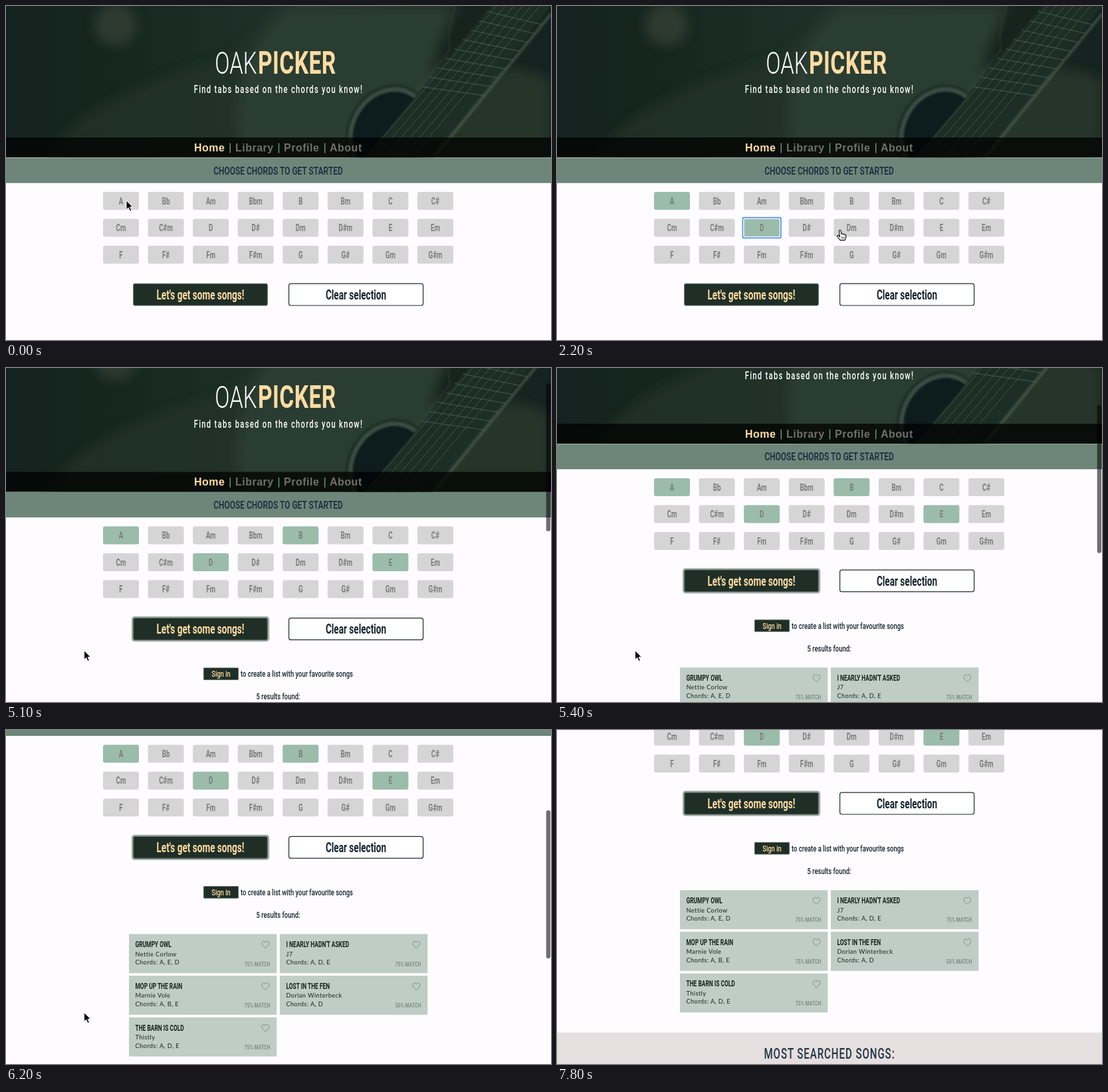
An HTML page that plays this animation: 820 px wide and 503 px high, repeating every 7.9 s.

```html
<!DOCTYPE html>
<html lang="en">
<head>
<meta charset="utf-8">
<title>Chord search</title>
<style>
  html, body { margin: 0; width: 100%; height: 100%; overflow: hidden; background: #fefcfe; }
  svg { display: block; width: 820px; height: 503px; }
  .cond { font-family: Roboto, "Open Sans", sans-serif; }
  .nav { font: bold 16px "Liberation Sans", Arial, sans-serif; letter-spacing: .5px; }
  .info { font: 500 9.2px Lato, "Open Sans", sans-serif; letter-spacing: .4px; fill: #25332d; }
</style>
</head>
<body>
<svg id="stage" viewBox="0 0 820 503"></svg>
<script>
const LOOP = 7900;
const CONDENSE = 0.7; // one factor turns the sans face into a condensed one
const DARK = '#1f2f27', CREAM = '#ffdca3', GREY = '#d6d5d6', GREEN = '#9bbcab';

const cond = (x, y, size, text, { fill = '#16242e', weight = 700, anchor = 'middle', gap = 0 } = {}) =>
  `<text class="cond" transform="translate(${x} ${y}) scale(${CONDENSE} 1)" font-size="${size}" fill="${fill}"
    font-weight="${weight}" text-anchor="${anchor}" letter-spacing="${gap}">${text}</text>`;

const rect = (x, y, w, h, fill, extra = '') =>
  `<rect x="${x}" y="${y}" width="${w}" height="${h}" fill="${fill}" ${extra}/>`;

const line = (x1, y1, x2, y2, extra) =>
  `<path d="M${x1} ${y1}L${x2} ${y2}" fill="none" ${extra}/>`;

const mix = (a, b, k) => a + (b - a) * k;

const CHORDS = ('A Bb Am Bbm B Bm C C# Cm C#m D D# Dm D#m E Em ' +
  'F F# Fm F#m G G# Gm G#m').split(' ');
const chordX = i => 146 + (i % 8) * 67.57;
const chordY = i => 280 + Math.floor(i / 8) * 40.5;

const CLICKS = [['A', 500], ['D', 1700], ['E', 2850], ['B', 3550]];
const SUBMIT_AT = 4400, RESULTS_AT = 4600, IDLE_AT = 7000;

const SONGS = [
  ['GRUMPY OWL', 'Nettie Corlow', 'A, E, D', 75],
  ["I NEARLY HADN'T ASKED", 'J7', 'A, D, E', 75],
  ['MOP UP THE RAIN', 'Marnie Vole', 'A, B, E', 75],
  ['LOST IN THE FEN', 'Dorian Winterbeck', 'A, D', 50],
  ['THE BARN IS COLD', 'Thistly', 'A, D, E', 75]
];

function photo() {
  let strings = '', frets = '';
  for (let i = 0; i < 6; i++) {
    strings += line(738 + i * 13, 0, 541 + i * 14, 228, 'stroke="#62766a" stroke-width=".9" opacity=".6"');
  }
  for (let i = 0; i < 9; i++) {
    const k = i / 9 * 0.62;
    frets += line(mix(724, 545, k), mix(8, 214, k), mix(806, 650, k), mix(28, 222, k),
      'stroke="#51665a" stroke-width="1.5" opacity=".55"');
  }
  return `<g clip-path="url(#photoClip)">
    ${rect(0, 0, 820, 228, 'url(#backdrop)')}
    <g filter="url(#blur)">
      <circle cx="165" cy="28" r="32" fill="#344135" opacity=".75"/>
      <path d="M60 228C110 150 210 110 330 80L420 0H560L470 228Z" fill="#22332c" opacity=".7"/>
      <path d="M430 0H676C660 40 640 75 668 100L700 145 640 235H360C330 150 360 50 430 0Z" fill="#2c3d33"/>
      <path d="M690 110Q760 80 820 112V228H620Z" fill="#283529"/>
      <path d="M684 0H740L640 110Q640 60 684 0Z" fill="#13231f"/>
    </g>
    <g filter="url(#soft)">
      <path d="M430 0H677Q662 38 668 66L600 150" fill="none" stroke="#3a4a3e" stroke-width="2" opacity=".5"/>
      <ellipse cx="577" cy="190" rx="56" ry="66" transform="rotate(28 577 190)" fill="#0e1d1c"
        stroke="#3b4f44" stroke-width="5"/>
      <ellipse cx="577" cy="190" rx="62" ry="72" transform="rotate(28 577 190)" fill="none"
        stroke="#1a2a25" stroke-width="3"/>
      <path d="M730 0H820L642 228H540Z" fill="#1b2d27"/>
      <path d="M820 12L644 228" stroke="#4c5f50" stroke-width="4" opacity=".7"/>
    </g>
    ${frets}${strings}
    ${rect(0, 198, 820, 30, '#000', 'opacity=".74"')}
  </g>`;
}

function header() {
  const nav = [[283, 'Home', CREAM], [345, 'Library'], [418, 'Profile'], [487, 'About']]
    .map(([x, label, fill = '#706f6d']) => `<text class="nav" x="${x}" y="218.8" fill="${fill}">${label}</text>`).join('');
  const bars = [337.3, 410.5, 479.7].map(x => rect(x - .7, 206.5, 1.4, 15, '#6d9a85')).join('');
  return photo() +
    cond(377.5, 102, 47, 'OAK', { fill: '#fff', weight: 300, anchor: 'end' }) +
    cond(379, 102, 48, 'PICKER', { fill: CREAM, anchor: 'start', gap: .6 }) +
    cond(410, 131.3, 16, 'Find tabs based on the chords you know!', { fill: '#fff', weight: 500, gap: 1.85 }) +
    nav + bars +
    rect(0, 228.5, 820, 37.7, '#6e867a') + rect(0, 265.7, 820, .7, '#566c61') +
    cond(409.5, 253.6, 17.1, 'CHOOSE CHORDS TO GET STARTED', { fill: '#213443' });
}

const chordButtons = () => CHORDS.map((name, i) =>
  rect(chordX(i), chordY(i), 54, 27, GREY, `rx="3" id="chord${i}"`) +
  cond(chordX(i) + 27, chordY(i) + 18.7, 14, name, { fill: '#7b7b7b' })).join('');

const actions = () =>
  `<rect id="submitRing" x="190.3" y="416.9" width="204.6" height="35.4" rx="3" fill="none" stroke="#9fa9a6" stroke-width="2.6"/>` +
  rect(191.7, 418.2, 201.6, 32.8, DARK, 'rx="2" stroke="#59665f" stroke-width="1"') +
  cond(292.5, 441.8, 19.4, "Let's get some songs!", { fill: CREAM }) +
  rect(425.6, 418.2, 202, 32.8, '#fff', `rx="3" stroke="${DARK}" stroke-width="1.2"`) +
  cond(526.5, 441.8, 19.4, 'Clear selection');

function card([title, artist, chords, match], i) {
  const x = 185 + (i % 2) * 227, y = 565.2 + Math.floor(i / 2) * 62.7;
  return `<g transform="translate(${x} ${y})">
    ${rect(0, 0, 222.3, 58.8, '#c0ccc6')}
    ${cond(9.5, 19.8, 12, title, { fill: '#15231d', anchor: 'start' })}
    <text class="info" x="9.5" y="33.4">${artist}</text>
    <text class="info" x="9.5" y="45.9">Chords: ${chords}</text>
    ${cond(212.5, 48.2, 9.9, match + '% MATCH', { fill: '#7c8f86', anchor: 'end' })}
    <path d="M205.4 21.2C201.8 18.3 200 16.2 200 13.9 200 10.6 204 9.9 205.4 12.6 206.8 9.9 210.8 10.6 210.8 13.9 210.8 16.2 209 18.3 205.4 21.2Z"
      fill="none" stroke="#7d8f87" stroke-width="1"/>
  </g>`;
}

const results = () => `<g id="results">
  ${rect(297.4, 493.3, 52.2, 17.8, DARK, 'rx="1" stroke="#59665f" stroke-width=".8"')}
  ${cond(323.5, 506.7, 13.4, 'Sign in', { fill: CREAM, weight: 500 })}
  ${cond(353, 506.7, 13.5, 'to create a list with your favourite songs', { weight: 500, anchor: 'start' })}
  ${cond(409.5, 540.9, 13.5, '5 results found:', { weight: 500 })}
  ${SONGS.map(card).join('')}
  ${rect(0, 779.6, 820, 120, '#e5dfdf')}
  ${cond(410, 819.4, 21.6, 'MOST SEARCHED SONGS:', { fill: '#203543', weight: 500, gap: 1.3 })}
</g>`;

const focusRing = () => `<g id="focus">
  <rect x="-1.7" y="-1.7" width="57.4" height="30.4" rx="2" fill="none" stroke="#5b95f3" stroke-width="1.9"/>
  <rect x="-.2" y="-.2" width="54.4" height="27.4" rx="2" fill="none" stroke="#fff" stroke-width="1"/>
</g>`;

const cursor = () => `<g id="cursor">
  <path id="arrow" d="M0 0V13.6L3.2 10.7 5.5 16 7.9 15 5.6 9.8H9.9Z" fill="#000" stroke="#fff" stroke-width="1"/>
  <g id="hand">
    <path d="M-1.5 .6C-1.5-.9 1-.9 1.2 .6L2 5.4C2.6 4.4 4.3 4.7 4.5 5.8 5.2 5 6.6 5.4 6.8 6.5 7.6 6 8.8 6.5 8.8 7.8
      L8.6 11.4 7.2 14.6H-.2C-1.2 12.5-3.6 10.4-4.4 8.8-5 7.5-3.6 6.7-2.6 7.7L-.6 9.6Z"
      fill="#fff" stroke="#000" stroke-width="1.1" stroke-linejoin="round"/>
    <path d="M2.2 9.6V12.4M4.3 9.6V12.4M6.3 9.6V12.4" stroke="#000" stroke-width=".8"/>
  </g>
</g>`;

document.getElementById('stage').innerHTML = `<defs>
  <linearGradient id="backdrop">
    <stop offset="0" stop-color="#14231f"/><stop offset=".2" stop-color="#15271f"/>
    <stop offset=".5" stop-color="#1f312a"/><stop offset="1" stop-color="#14231f"/>
  </linearGradient>
  <clipPath id="photoClip"><rect width="820" height="228.5"/></clipPath>
  <filter id="blur" x="-20%" y="-20%" width="140%" height="140%"><feGaussianBlur stdDeviation="9"/></filter>
  <filter id="soft"><feGaussianBlur stdDeviation="1.6"/></filter>
</defs>
<g id="page">${header()}${chordButtons()}${focusRing()}${actions()}${results()}</g>
<rect id="scrollbar" x="812.7" width="6.4" height="223" rx="3.2" fill="#000"/>
${cursor()}`;

const el = id => document.getElementById(id);
const show = (id, on) => el(id).setAttribute('display', on ? 'inline' : 'none');

// Keys are [time, ...values]
const POINTER = [[0, 181, 293], [900, 181, 294], [1500, 306, 333], [1850, 310, 335], [2200, 426, 338],
  [2700, 578, 335], [3000, 578, 335], [3450, 444, 295], [3600, 443, 295], [4000, 326, 414],
  [4200, 300, 435], [4450, 298, 435], [4800, 138, 428], [5000, 117.5, 425.5]];
const SCROLL = [[4900, 0], [5200, 62], [5400, 114], [5650, 143], [5900, 169], [6100, 225], [6300, 290], [6500, 324]];
const linear = k => k, smooth = k => k * k * (3 - 2 * k);

function sample(keys, t, ease) {
  if (t <= keys[0][0]) return keys[0].slice(1);
  const next = keys.findIndex(key => key[0] > t);
  if (next < 0) return keys[keys.length - 1].slice(1);
  const a = keys[next - 1], b = keys[next];
  const k = ease((t - a[0]) / (b[0] - a[0]));
  return a.slice(1).map((v, i) => mix(v, b[i + 1], k));
}

const inside = (x, y, bx, by, w, h) => x >= bx && x <= bx + w && y >= by && y <= by + h;

function overButton(x, y) {
  return CHORDS.some((_, i) => inside(x, y, chordX(i), chordY(i), 54, 27)) ||
    inside(x, y, 191, 418, 203, 33);
}

function draw(t) {
  const clicked = CLICKS.filter(click => t >= click[1]).map(click => CHORDS.indexOf(click[0]));
  CHORDS.forEach((_, i) => el('chord' + i).setAttribute('fill', clicked.includes(i) ? GREEN : GREY));

  const focused = clicked[clicked.length - 1];
  show('focus', clicked.length > 0 && t < SUBMIT_AT);
  if (clicked.length) el('focus').setAttribute('transform', `translate(${chordX(focused)} ${chordY(focused)})`);
  show('submitRing', t >= SUBMIT_AT);
  show('results', t >= RESULTS_AT);

  const [scroll] = sample(SCROLL, t, linear);
  el('page').setAttribute('transform', `translate(0 ${-scroll})`);
  el('scrollbar').setAttribute('y', 4 + scroll * 0.4537);
  const fade = Math.min(1, Math.max(0, (IDLE_AT + 200 - t) / 200));
  el('scrollbar').setAttribute('opacity', scroll > 0 ? 0.56 * fade : 0);

  const [x, y] = sample(POINTER, t, smooth);
  const hand = t >= 100 && scroll === 0 && overButton(x, y);
  el('cursor').setAttribute('transform', `translate(${x} ${y})`);
  show('cursor', t < IDLE_AT);
  show('hand', hand);
  show('arrow', !hand);
}

const start = performance.now();
function tick() {
  draw((performance.now() - start) % LOOP);
  requestAnimationFrame(tick);
}
tick();
</script>
</body>
</html>
```
